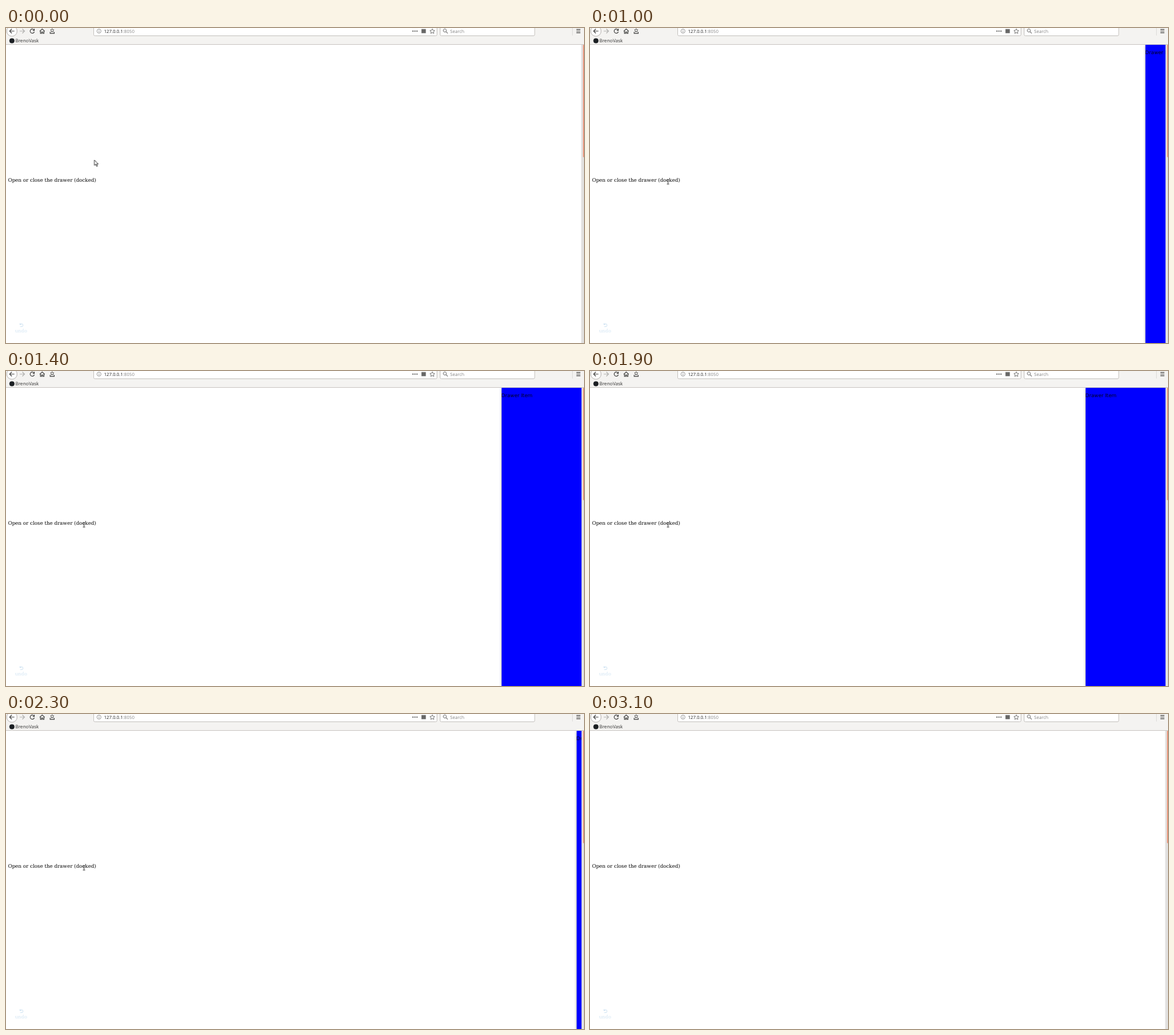
Recreate the animation shown at these times as an HTML page. Size 926 by 506 pixels, loop 3800 ms.

```html
<!DOCTYPE html>
<html lang="en">
<head>
<meta charset="utf-8">
<title>Docked drawer</title>
<style>
  html, body { margin: 0; width: 100%; height: 100%; overflow: hidden; background: #fff; }
  #stage { position: relative; width: 926px; height: 506px; overflow: hidden; }
  svg { position: absolute; left: 0; top: 0; text-rendering: geometricPrecision; }
  .ui { font: 7.2px "Open Sans", "Noto Sans", sans-serif; }
  .page { font: 8px "DejaVu Serif", serif; }
  .icon { fill: none; stroke: #4a4a49; stroke-width: 1.2; }
  .field { fill: #fff; stroke: #c6c3c0; }
  #view { position: absolute; left: 0; top: 27px; width: 921.5px; height: 479px; overflow: hidden; }
  #drawer {
    position: absolute; left: 793.5px; top: 0; width: 128px; height: 100%;
    background: #00f; box-shadow: 0 1px 4px rgba(0, 0, 0, .16), 0 1px 4px rgba(0, 0, 0, .23);
    font: 8px/10px "DejaVu Sans", sans-serif; color: rgba(0, 0, 0, .87);
    text-rendering: geometricPrecision;
  }
  #drawer span { position: absolute; left: 0; top: 8px; white-space: nowrap; }
</style>
</head>
<body>
<div id="stage">
  <svg width="926" height="506">
    <!-- toolbar -->
    <rect width="926" height="26.5" fill="#f4f3f1"/>
    <rect y="26" width="926" height="1" fill="#cbc8c5"/>
    <circle cx="9.5" cy="5" r="8.3" fill="#fff" stroke="#b9b6b3"/>
    <g class="icon">
      <path d="M13.5 5H6M9.3 1.5L5.8 5l3.5 3.5"/>
      <path d="M22 5h7.5M26.2 1.5L29.7 5l-3.5 3.5" stroke="#b4b3b1"/>
      <path d="M44.8 2.9A3.4 3.4 0 1 0 45.4 6"/>
      <path d="M46 .8v3.7h-3.7z" fill="#4a4a49" stroke="none"/>
      <path d="M54 5.3L58 1.5l4 3.8M55.2 5v3.7h1.9V6.4h1.8v2.3h1.9V5"/>
      <path d="M70.7 6.2v2.5h6.6V6.2"/>
      <path d="M74 1l.9 1.7 1.9.3-1.4 1.4.3 1.9L74 5.5l-1.7.8.3-1.9-1.4-1.4 1.9-.3z" stroke-width=".9"/>
    </g>

    <g class="field">
      <rect x="140.5" y="-2.5" width="550" height="15" rx="2"/>
      <rect x="695.5" y="-2.5" width="151.5" height="15" rx="2"/>
    </g>
    <g class="icon" stroke-width="1">
      <circle cx="149" cy="5" r="3.3" style="stroke:#888;stroke-width:.8"/>
      <path d="M149 4.5v2.4M149 2.8v.9" style="stroke:#888;stroke-width:.9"/>
      <path d="M683 1.3l1.2 2.4 2.7.4-2 1.9.5 2.7-2.4-1.3-2.4 1.3.5-2.7-2-1.9 2.7-.4z" style="stroke:#686867;stroke-width:.9"/>
      <circle cx="703" cy="4" r="2.5" style="stroke:#777;stroke-width:1"/>
      <path d="M704.9 5.9l2.8 2.8" style="stroke:#777"/>
      <path d="M913.8 2.4h6.4M913.8 5h6.4M913.8 7.6h6.4"/>
    </g>
    <g fill="#5c5c5b">
      <circle cx="652" cy="5" r="1.1"/>
      <circle cx="655.2" cy="5" r="1.1"/>
      <circle cx="658.4" cy="5" r="1.1"/>
      <rect x="665.6" y="1.7" width="7" height="6.6" fill="#686867"/>
    </g>
    <rect x="907" width="1" height="12" fill="#dedcda"/>
    <g class="ui">
      <text x="157" y="7.7" fill="#222">127.0.0.1<tspan fill="#888">:8050</tspan></text>
      <text x="711.5" y="7.7" fill="#858585">Search</text>
      <circle cx="9.5" cy="20.5" r="4.1" fill="#1b1f23"/>
      <text x="15" y="23" fill="#333" font-size="7.6" style="font-size:7.6px">BrenoVask</text>
    </g>

    <!-- page -->
    <g class="page">
      <text x="3.2" y="246.6">Open or close the drawer (docked)</text>
      <g fill="#d3e5f3">
        <text x="14.4" y="489" style="font-size:7.7px">undo</text>
        <path d="M22.5 475.2H25a2.2 2.2 0 0 1 0 4.5h-2.3" fill="none" stroke="#cfe3f2"/>
        <path d="M21.8 473.8v3.2h3z"/>
      </g>
    </g>

    <!-- scrollbar -->
    <rect x="921.5" y="27" width="4.5" height="479" fill="#e1e0df"/>
    <rect x="924.6" y="27" width="2" height="180.5" rx=".8" fill="#f08a6c"/>
  </svg>

  <div id="view"><div id="drawer"><span>Drawer Item</span></div></div>

  <svg width="926" height="506">
    <g id="cursor">
      <path id="arrow" d="M0 0V8.6L2 6.8l1.6 3.5 1.5-.7-1.6-3.2h2.7z" fill="#fff" stroke="#222" stroke-width=".9"/>
      <path id="beam" d="M-1.8-3.2h1.3L0-2.8l.5-.4h1.3M0-2.8V3.4M-1.8 3.8h1.3L0 3.4l.5.4h1.3" fill="none" stroke="#222" stroke-width=".9"/>
    </g>
  </svg>
</div>

<script>
  const LOOP = 3800, TICK = 100;
  const tracks = [];

  // Each key is [time in ms, value, easing towards the next key].
  function track(id, prop, keys) {
    const frames = keys.map(([ms, value, easing = 'linear']) =>
      ({ offset: ms / LOOP, [prop]: value, easing }));
    const anim = document.getElementById(id).animate(frames, { duration: LOOP, fill: 'both' });
    anim.pause();
    tracks.push(anim);
  }

  const glide = 'cubic-bezier(.23, 1, .32, 1)';
  const open = 'translateX(0px)', shut = 'translateX(133px)';
  track('drawer', 'transform', [
    [0, shut], [970, shut, glide], [1420, open],
    [2135, open, glide], [2585, shut], [LOOP, shut]
  ]);

  const route = [
    [0, 141.5, 212], [100, 143, 212.5], [200, 146, 216], [300, 143, 225],
    [400, 134, 235], [500, 127, 243.5], [600, 125, 247], [2500, 125, 247],
    [2600, 118, 228], [2700, 111, 203], [2800, 97, 150],
    [2900, 75, 78], [3000, 46, 5], [3100, 40, -15], [LOOP, 40, -15]
  ];
  track('cursor', 'transform', route.map(([ms, x, y]) => [ms, `translate(${x}px, ${y}px)`]));

  const hold = 'steps(1)';
  const toggle = (id, first, mid) => track(id, 'opacity', [
    [0, first, hold], [500, mid, hold], [2600, first, hold], [3100, 0, hold], [LOOP, 0]
  ]);
  toggle('arrow', 1, 0);
  toggle('beam', 0, 1);

  const start = performance.now();
  function draw() {
    const time = Math.max(0, performance.now() - start) % LOOP;
    const shown = Math.floor(time / TICK) * TICK + 0.5;
    for (const anim of tracks) anim.currentTime = shown;
    requestAnimationFrame(draw);
  }
  draw();
</script>
</body>
</html>
```
